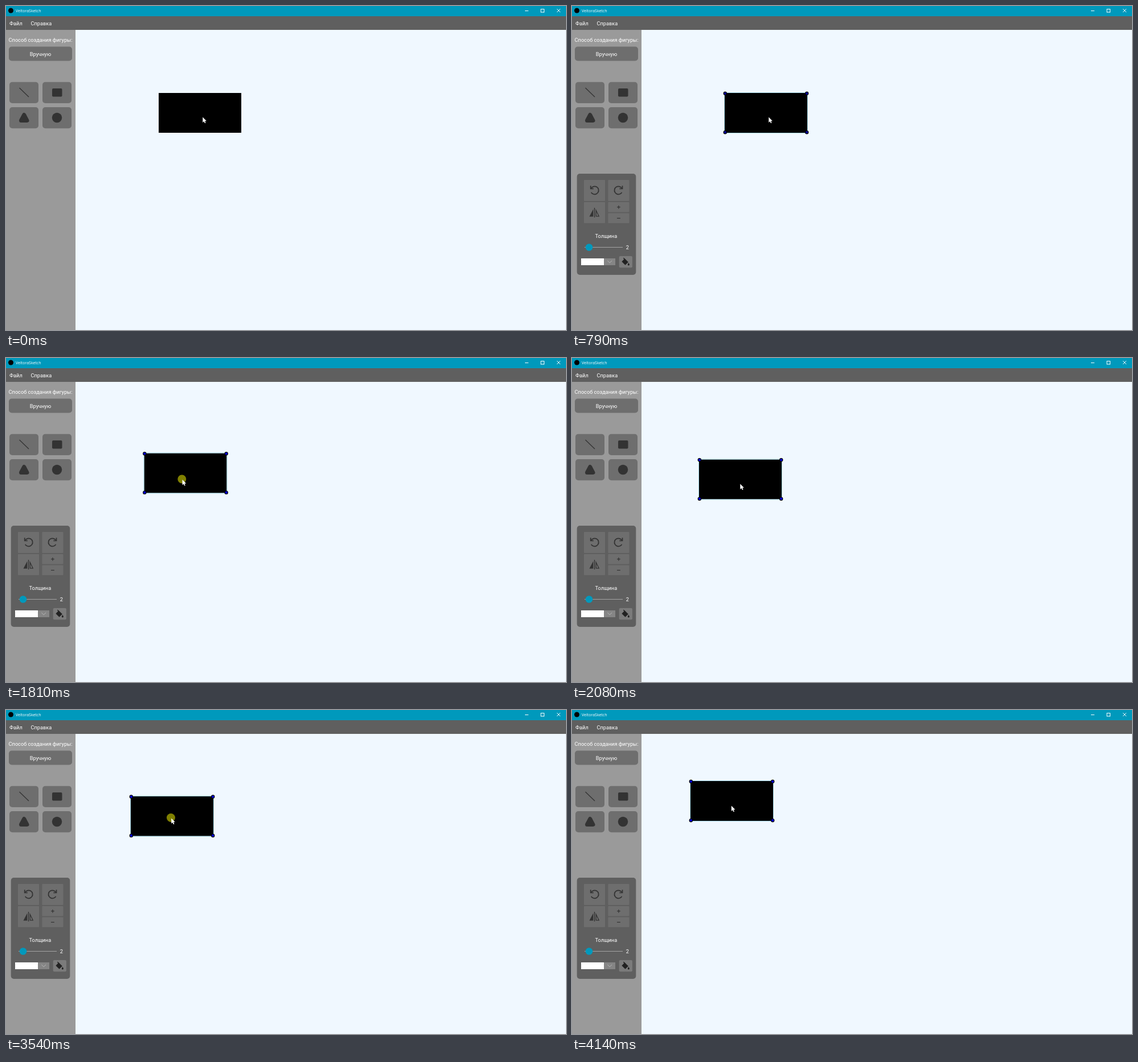
An HTML page with a canvas for the animation above (4280 ms loop, 983 px wide and 570 px high).

```html
<!DOCTYPE html>
<html lang="ru">
<head>
<meta charset="utf-8">
<title>VeltoraSketch</title>
<style>
html, body { margin: 0; width: 100%; height: 100%; overflow: hidden; background: #f0f8ff; }
canvas { display: block; }
</style>
</head>
<body>
<canvas id="stage" width="983" height="570"></canvas>
<script>
const ctx = document.getElementById('stage').getContext('2d');
const LOOP = 4280, TICK = 70, SELECTED = 790;
const INK = '#333333', ACCENT = '#0099bc', BUTTON = '#6e6e6e', PANEL = '#5f5f5f';
const WIDTH = 145, HEIGHT = 70;
const presses = [[520, 650], [1460, 2080], [2740, 2870], [3200, 4140]];

const linear = k => k;
const easeIn = k => k ** 1.4;
const smooth = k => k * k * (3 - 2 * k);

// Distance covered at time t by a move of the given length.
function move(t, length, from, to, ease) {
  const k = Math.min(1, Math.max(0, (t - from) / (to - from)));
  return length * ease(k);
}

// First drag goes down-left, the second one up; the shape trails the cursor.
function shapeAt(t) {
  return [
    268 + move(t, -45, 1530, 1950, easeIn) + move(t, -15, 3330, 3950, smooth),
    153 + move(t, 25.5, 1530, 1950, easeIn) + move(t, -53.5, 3200, 3880, smooth)
  ];
}

function cursorAt(t) {
  return [
    344.5 + move(t, -50, 1460, 1950, linear) + move(t, -15.5, 3330, 3950 - TICK, smooth),
    194.5 + move(t, 26, 1460, 1950, linear) + move(t, -53, 3200, 3880 - TICK, smooth)
  ];
}

// The screen refreshes in ticks, restarting with each movement.
function tick(t) {
  const base = [3740, 3190, 1460].find(start => t >= start) || 0;
  return base + Math.floor((t - base) / TICK) * TICK;
}

function box(x, y, w, h, color, r = 0) {
  ctx.fillStyle = color;
  ctx.beginPath();
  ctx.roundRect(x, y, w, h, r);
  ctx.fill();
}

function disc(x, y, r, color) {
  ctx.fillStyle = color;
  ctx.beginPath();
  ctx.arc(x, y, r, 0, Math.PI * 2);
  ctx.fill();
}

function trace(points, close) {
  ctx.beginPath();
  points.forEach(([x, y]) => ctx.lineTo(x, y));
  if (close) ctx.closePath();
}

function line(points, color, width = 1, close = false) {
  trace(points, close);
  ctx.strokeStyle = color;
  ctx.lineWidth = width;
  ctx.stroke();
}

function polygon(points, color) {
  trace(points, true);
  ctx.fillStyle = color;
  ctx.fill();
}

function label(text, x, y, align = 'left', font = '9.2px Roboto, sans-serif') {
  ctx.font = font;
  ctx.textAlign = align;
  ctx.fillStyle = '#fff';
  ctx.fillText(text, x, y);
}

function drawWindow() {
  box(0, 0, 983, 570, '#f0f8ff');
  box(0, 0, 983, 18, ACCENT);
  disc(8.5, 8, 4.5, '#000');
  label('VeltoraSketch', 17, 11, 'left', '7px "Open Sans", sans-serif');
  line([[911, 8.5], [917, 8.5]], '#fff');
  ctx.strokeRect(939, 5.5, 5.5, 5.5);
  line([[967, 5], [973, 11]], '#fff', 0.9);
  line([[973, 5], [967, 11]], '#fff', 0.9);
  box(0, 18, 983, 24, PANEL);
  label('Файл', 6, 34);
  label('Справка', 43.5, 34);
}

function drawTools() {
  box(0, 42, 122, 528, '#9a9a9a');
  label('Способ создания фигуры:', 60.5, 63, 'center');
  box(5, 71.5, 111, 25, BUTTON, 5);
  label('Вручную', 60.5, 87.5, 'center');
  for (const x of [6, 64]) {
    for (const y of [133.7, 178]) box(x, y, 51, 37.3, BUTTON, 5);
  }
  line([[23.5, 144], [40, 160]], INK, 1.3);
  box(81, 145, 17.5, 14.5, INK, 2);
  const triangle = [[31.8, 191.5], [37, 201.5], [26.5, 201.5]];
  ctx.lineJoin = 'round';
  polygon(triangle, INK);
  line(triangle, INK, 7, true);
  ctx.lineJoin = 'miter';
  disc(89.5, 196.5, 8.7, INK);
}

function rotateIcon(x, y, mirror) {
  ctx.save();
  ctx.translate(x, y);
  ctx.scale(mirror, 1);
  ctx.strokeStyle = INK;
  ctx.lineWidth = 1.8;
  ctx.beginPath();
  ctx.arc(0, 0, 7, -2.6, 2.6);
  ctx.stroke();
  line([[-7, -8], [-7, -2.8], [-1.8, -2.8]], INK, 1.7);
  ctx.restore();
}

function drawPanel() {
  box(8.7, 295, 103.6, 178, PANEL, 5);
  for (const x of [21, 63.4]) box(x, 306, 37, 37, BUTTON, 1);
  box(21, 345, 37, 37, BUTTON, 1);
  for (const y of [345, 364.6]) {
    box(63.4, y, 37, 17.5, BUTTON, 1);
    line([[79, y + 8.8], [84.8, y + 8.8]], INK, 1.2);
  }
  line([[81.9, 350.9], [81.9, 356.7]], INK, 1.2);
  rotateIcon(39.7, 324.3, 1);
  rotateIcon(81.5, 324.3, -1);
  line([[39.5, 355], [39.5, 372]], INK, 1.3);
  polygon([[30.5, 370.5], [37.3, 357.5], [37.3, 370.5]], INK);
  line([[42.2, 359.5], [47.2, 369.8], [42.2, 369.8]], INK, 1.3, true);

  label('Толщина', 59.8, 407.5, 'center');
  line([[22, 424.5], [89, 424.5]], '#a4a4a4', 1.2);
  disc(30, 424.5, 6.3, ACCENT);
  label('2', 97.3, 428, 'center');

  box(16, 444, 40, 12, '#fff');
  box(56, 444, 20, 12, '#858585');
  line([[62.3, 448], [66.2, 451.8], [70.1, 448]], '#b5b5b5', 1);
  box(82.7, 440, 23.2, 20.3, '#7b7b7b', 2);
  polygon([[92.5, 444.2], [98.8, 450.5], [93.5, 455.8], [87.4, 449.7]], '#222');
  line([[90.3, 443.3], [94, 447]], '#222', 1.3);
  polygon([[99.3, 451.7], [100.8, 454.8], [97.8, 454.8]], '#222');
  disc(99.3, 455, 1.5, '#222');
}

function drawSelection(x, y, color) {
  const inset = 0.8;
  ctx.strokeStyle = '#a8dcea';
  ctx.lineWidth = 1;
  ctx.strokeRect(x - 0.5, y - 0.5, WIDTH + 1, HEIGHT + 1);
  for (const dx of [inset, WIDTH - inset]) {
    for (const dy of [inset, HEIGHT - inset]) {
      disc(x + dx, y + dy, 3.2, '#000');
      disc(x + dx, y + dy, 2.1, color);
    }
  }
}

function drawCursor(x, y, pressed) {
  if (pressed) disc(x, y, 7.5, 'rgba(255,255,0,0.5)');
  const arrow = [[0.8, 1], [0.8, 10.4], [3, 8.5], [4.5, 11.7], [6, 11], [4.6, 7.9], [7.4, 7.8]];
  polygon(arrow.map(([dx, dy]) => [x + dx, y + dy]), '#fff');
}

function draw(t) {
  const now = tick(t);
  const [x, y] = shapeAt(now);
  drawWindow();
  drawTools();
  box(x, y, WIDTH, HEIGHT, '#000');
  if (t >= SELECTED) {
    const step = Math.min(2, Math.floor((t - SELECTED) / TICK));
    drawPanel();
    drawSelection(x, y, `rgb(0, 0, ${154 + 33 * step})`);
  }
  drawCursor(...cursorAt(now), presses.some(([from, to]) => t >= from && t < to));
}

let start;
function frame(time) {
  start ??= time;
  draw((time - start) % LOOP);
  requestAnimationFrame(frame);
}
requestAnimationFrame(frame);
</script>
</body>
</html>
```
